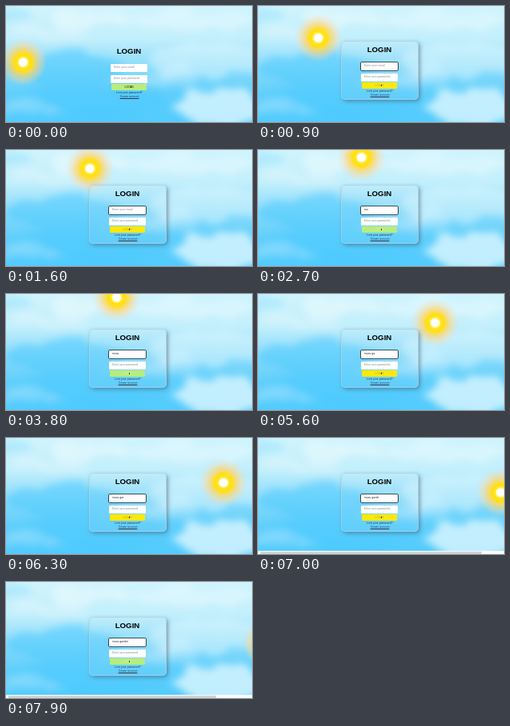
These frames come from a looping animation (308x146 px, 8 s). An HTML page:

```html
<!DOCTYPE html>
<html lang="en">
<head>
<meta charset="utf-8">
<title>Login</title>
<style>
html, body { margin: 0; width: 100%; height: 100%; overflow: hidden; }
body { position: relative; font-family: "Liberation Sans", Arial, sans-serif; }
svg, div { position: absolute; box-sizing: border-box; }
svg { left: 0; top: 0; }
#sun {
  left: -32px; top: -32px; width: 64px; height: 64px;
  background: radial-gradient(circle closest-side, #fff 0 4.5px, #fff27a 6px, #ffe41a 7.5px, #ffde18 11px,
    rgba(255, 218, 70, .88) 14px, rgba(255, 212, 110, .65) 18px, rgba(255, 216, 150, .4) 23px, rgba(255, 225, 185, 0) 30px);
}
#card {
  left: 104px; top: 44px; width: 97px; height: 74px; border-radius: 5px;
  background: rgba(215, 235, 245, .1); border: .5px solid rgba(180, 210, 224, .7);
  box-shadow: 2px 2px 5px rgba(70, 90, 105, .55);
}
#form { left: 0; top: 0; width: 308px; height: 146px; }
#form div { white-space: pre; text-align: center; }
#title { left: 122px; top: 49px; width: 60px; font: bold 9.7px/12px "Liberation Sans", Arial, sans-serif; color: #000; }
#form .field {
  left: 129px; width: 46px; height: 10px; padding-left: 4px; border-radius: 1px;
  background: #fff; font-size: 3.5px; line-height: 9.5px; text-align: left; color: #888;
}
#user { top: 71px; }
#pass { top: 84.5px; }
#button { left: 130px; top: 96px; width: 44px; height: 8px; border-radius: 1px; font-size: 3.5px; line-height: 8px; }
#dot { left: 153.5px; top: 99px; width: 1.5px; height: 2px; background: #333; }
.link { left: 122px; width: 61px; font-size: 3.5px; line-height: 5px; color: #234; }
#bar { left: 0; top: 142px; width: 308px; height: 4px; background: #f8fbfc; }
#thumb { left: 3px; top: 1px; height: 3px; background: #cfd4d6; }
</style>
</head>
<body>
<svg width="308" height="146" viewBox="0 0 308 146">
  <defs>
    <linearGradient id="sky" x2="0" y2="1">
      <stop offset="0" stop-color="#d0f4fd"/>
      <stop offset=".28" stop-color="#c2effc"/>
      <stop offset=".5" stop-color="#90defb"/>
      <stop offset=".75" stop-color="#60cffc"/>
      <stop offset="1" stop-color="#52cbfd"/>
    </linearGradient>
    <filter id="cloud" x="-20%" y="-20%" width="140%" height="140%" color-interpolation-filters="sRGB">
      <feTurbulence type="fractalNoise" baseFrequency=".02 .04" numOctaves="4" seed="8"/>
      <feDisplacementMap in="SourceGraphic" scale="34" xChannelSelector="R" yChannelSelector="G"/>
      <feGaussianBlur stdDeviation="5"/>
    </filter>
  </defs>
  <rect width="308" height="146" fill="url(#sky)"/>
  <g id="clouds" filter="url(#cloud)"></g>
</svg>
<div id="sun"></div>
<div id="card"></div>
<div id="form">
  <div id="title">LOGIN</div>
  <div id="user" class="field"></div>
  <div id="pass" class="field">Enter your password</div>
  <div id="button">LOGIN</div>
  <div id="dot"></div>
  <div class="link" style="top:104.5px">Lost your password?</div>
  <div class="link" style="top:109.5px;color:#335;text-decoration:underline">Create account</div>
</div>
<div id="bar"><div id="thumb"></div></div>
<script>
const $ = id => document.getElementById(id);
const LOOP = 8000, STEP = 100, APEX = 4330, HALF = 5000;
const path = [[0, 83], [139.5, 3.8], [336.5, 81.5]];
const typed = "moss garden";
const WHITE = "#f0fcfe", BLUE = "#46c8ff";

// Fill, centre, radii and opacity
const clouds = [
  [BLUE, 75, 80, 75, 24, .5], [BLUE, 110, 122, 90, 22, .4], [BLUE, 12, 12, 26, 12, .2],
  [WHITE, 110, 18, 50, 10, .5], [WHITE, 235, 16, 75, 14, .4], [WHITE, 50, 36, 45, 8, .3],
  [WHITE, 255, 68, 75, 22, .4], [WHITE, 205, 90, 35, 14, .25],
  [WHITE, 270, 126, 62, 24, .7], [WHITE, 30, 130, 45, 7, .25]
];
$("clouds").innerHTML = clouds.map(([fill, x, y, rx, ry, o]) =>
  `<ellipse fill="${fill}" cx="${x}" cy="${y}" rx="${rx}" ry="${ry}" opacity="${o}"/>`).join("");

const clamp = v => Math.max(0, Math.min(1, v));
const bezier = (a, b, u) => 3 * (1 - u) ** 2 * u * a + 3 * (1 - u) * u * u * b + u ** 3;

// The CSS "ease" curve
function ease(p) {
  let lo = 0, hi = 1;
  for (let i = 0; i < 24; i++) {
    const mid = (lo + hi) / 2;
    if (bezier(.25, .25, mid) < p) lo = mid; else hi = mid;
  }
  return bezier(.1, 1, lo);
}

function sunAt(t) {
  const leg = t < APEX ? 0 : 1;
  const e = ease(clamp((t - APEX) / HALF + 1 - leg));
  return path[leg].map((v, i) => v + (path[leg + 1][i] - v) * e);
}

function draw(t) {
  const [x, y] = sunAt(t);
  $("sun").style.transform = `translate(${x}px, ${y}px)`;

  // The card lifts by two pixels as its shadow fades in
  const lift = ease(clamp((t - 200) / 500));
  const drop = `translate(${2 - 2 * lift}px, ${2 - 2 * lift}px)`;
  $("card").style.opacity = lift;
  $("card").style.transform = $("form").style.transform = drop;

  const n = Math.max(0, Math.floor((t - 1500) / 550)), user = $("user");
  user.textContent = n ? typed.slice(0, n) : "Enter your email";
  user.style.color = n ? "#222" : "#888";
  user.style.boxShadow = t < 700 ? "none" : "0 0 0 .8px #182028";

  const gap = Math.abs((t - 1250 + 2525 + 5050) % 5050 - 2525);
  const green = clamp((gap - 950) / 300);
  const mix = (a, b) => Math.round(a + (b - a) * green);
  $("button").style.background = `rgb(${mix(255, 184)}, ${mix(232, 236)}, ${mix(10, 126)})`;
  $("button").style.color = t < 200 ? "#111" : green > .5 ? "#d6efb0" : "#b9a820";

  const width = x + 35;
  $("bar").style.display = width > 308 ? "block" : "none";
  $("thumb").style.width = 308 * 308 / width - 3 + "px";
}

const start = performance.now();
function tick() {
  const t = (performance.now() - start) % LOOP;
  draw(Math.floor(t / STEP) * STEP);
  requestAnimationFrame(tick);
}
tick();
</script>
</body>
</html>
```
